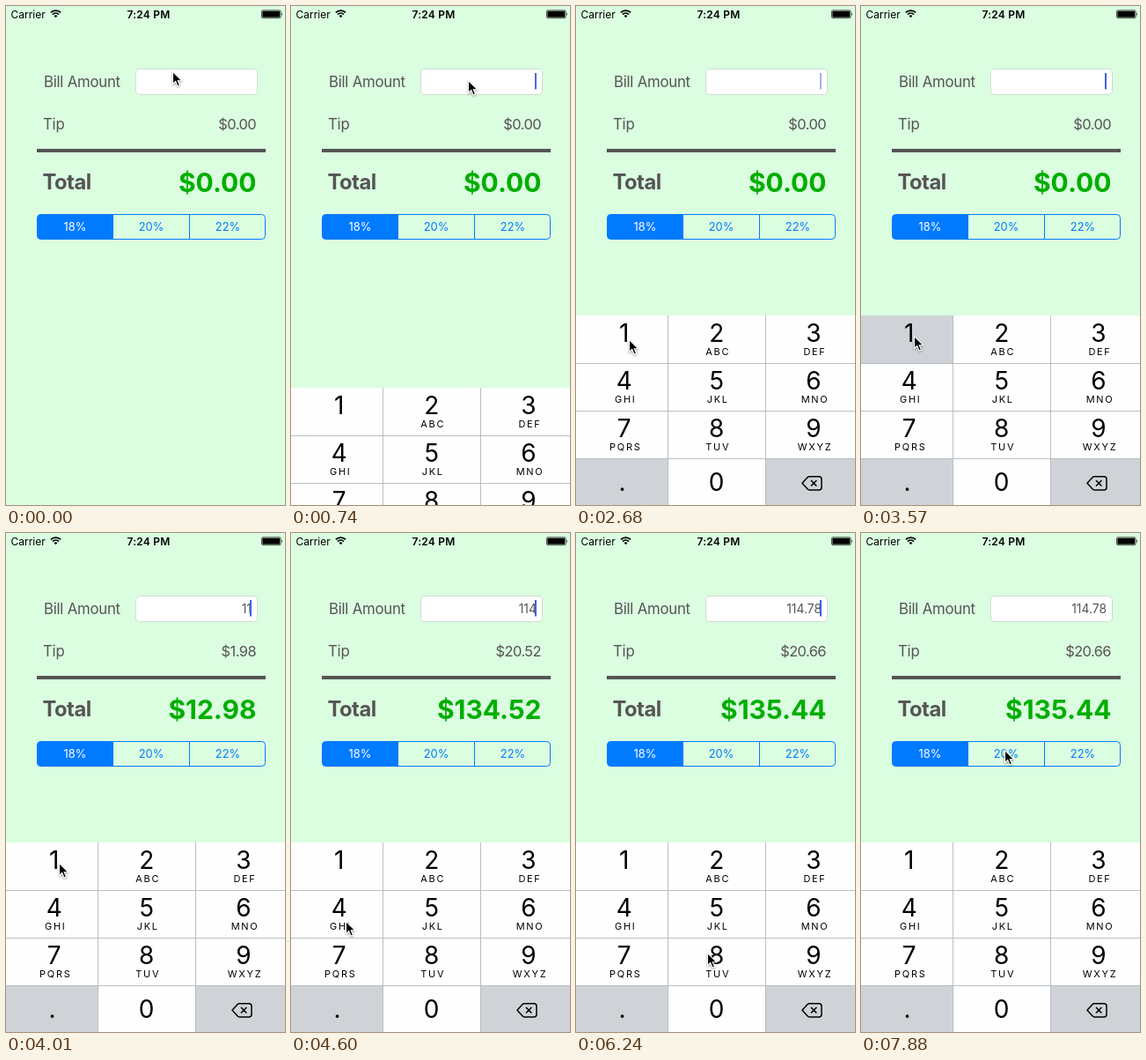
Write an HTML page that moves like this. It is 317x566 px and loops after 8 s.

```html
<!DOCTYPE html>
<html lang="en">
<head>
<meta charset="utf-8">
<title>Tip calculator</title>
<style>
  html, body { margin: 0; width: 100%; height: 100%; overflow: hidden; background: #dbfde0; }
  svg { display: block; font-family: Inter, sans-serif; }
  .label { font-size: 16.8px; letter-spacing: -.25px; fill: #555; }
  .tip { font-size: 16.5px; letter-spacing: -.6px; fill: #555; }
  .amount { font-size: 13.9px; fill: #555; }
  .heading { font-size: 23.8px; font-weight: 700; letter-spacing: -.5px; fill: #555; }
  .total { font-size: 30px; font-weight: 700; fill: #00ae00; }
  .segment { font-size: 12.9px; fill: #007aff; }
  .digit { font-size: 28px; }
  .letters { font-size: 11px; letter-spacing: 1.7px; }
  .end { text-anchor: end; }
  .mid { text-anchor: middle; }
</style>
</head>
<body>
<svg width="317" height="566" viewBox="0 0 317 566">
  <g id="status">
    <text x="5.5" y="14" font-size="12">Carrier</text>
    <g fill="none" stroke="#000" stroke-width="1.8">
      <path d="M50.9 7.4a7.9 7.9 0 0 1 11.2 0M53 9.6a5 5 0 0 1 7 0"/>
    </g>
    <path d="M56.5 13.2l-1.9-1.9a2.7 2.7 0 0 1 3.8 0z"/>
    <text class="mid" x="162" y="14" font-size="12" font-weight="600" letter-spacing=".2">7:24 PM</text>
    <rect x="290.5" y="4.9" width="21.6" height="8.8" rx="1.4" fill="none" stroke="#000" stroke-width=".7"/>
    <rect x="291.4" y="5.8" width="19.8" height="7" rx=".6"/>
    <path d="M313 7.6q1.6 1.7 0 3.4z"/>
  </g>

  <text class="label" x="43" y="91.5">Bill Amount</text>
  <rect x="147.5" y="71.5" width="138" height="29" rx="4.5" fill="#fff" stroke="#cbdbce" stroke-width=".9"/>
  <text class="amount end" id="amount" x="279" y="91"></text>
  <rect id="caret" x="277" y="76" width="2" height="18.5" fill="#4062d8"/>

  <text class="label" x="42" y="139.5">Tip</text>
  <text class="tip end" id="tip" x="284" y="139.5"></text>
  <rect x="35" y="162" width="260" height="4" fill="#555"/>
  <text class="heading" x="41.5" y="208">Total</text>
  <text class="total end" id="total" x="284.5" y="210.5"></text>

  <path d="M122 236.5H39.5a4 4 0 0 0-4 4v20a4 4 0 0 0 4 4H122z" fill="#007aff"/>
  <rect x="35.5" y="236.5" width="259" height="28" rx="4" fill="none" stroke="#007aff"/>
  <path d="M208.5 236.5v28" stroke="#007aff"/>
  <text class="segment mid" x="78.5" y="255" style="fill:#fff">18%</text>
  <text class="segment mid" x="165" y="255">20%</text>
  <text class="segment mid" x="252" y="255">22%</text>

  <g id="keyboard"></g>
  <path id="pointer" d="M0 0V14L3.2 11 5.6 16.6 8 15.6 5.7 10.2H10.1z" stroke="#fff" stroke-width="1.1"
    style="filter:drop-shadow(0 1px 1px #0006)"/>
</svg>
<script>
const DURATION = 8000, TICK = 148.5;   // the screen refreshes once per tick
const WHITE = '#fefefe', GRAY = '#cfd3d8';
const $ = id => document.getElementById(id);

// Keypad, laid out around its resting position
const columns = [0, 104.5, 215.5, 317], rows = [351, 405.5, 459.5, 513.5, 567];
const digitX = [54.7, 159.7, 269.9];
const names = [...'123456789.0<'];
const letters = ['', 'ABC', 'DEF', 'GHI', 'JKL', 'MNO', 'PQRS', 'TUV', 'WXYZ'];
const isGray = name => name === '.' || name === '<';

let cells = '', captions = '', lines = '';
names.forEach((name, i) => {
  const c = i % 3, r = Math.floor(i / 3), x = columns[c], y = rows[r];
  cells += `<rect id="key${name === '<' ? 'Del' : name}" x="${x}" y="${y}"
    width="${columns[c + 1] - x}" height="${rows[r + 1] - y}" fill="${isGray(name) ? GRAY : WHITE}"/>`;
  if (name === '<') {
    captions += `<path d="M257 541.3L263.2 534.6Q264 533.7 265.2 533.7H276a3 3 0 0 1 3 3v9.2a3 3 0 0 1-3 3
      H265.2Q264 548.9 263.2 548zM267 538l6.4 6.6M273.4 538l-6.4 6.6"
      fill="none" stroke="#000" stroke-width="1.5" stroke-linejoin="round"/>`;
    return;
  }
  const dx = name === '.' ? -2.2 : 0, baseline = r < 3 ? 381 + 54 * r : 550;
  captions += `<text class="digit mid" x="${digitX[c] + dx}" y="${baseline}">${name}</text>`;
  if (letters[i])
    captions += `<text class="letters mid" x="${digitX[c] + 1.6}" y="${baseline + 15}">${letters[i]}</text>`;
});
for (const y of rows.slice(1, 4)) lines += `M0 ${y}H317`;
for (const x of columns.slice(1, 3)) lines += `M${x} 351V567`;
$('keyboard').innerHTML = cells + `<path d="${lines}" stroke="#b4b8bc" stroke-width=".9"/>` + captions;

// Pointer stops: [tick, x, y]
const stops = [
  [0, 189, 74], [3, 201, 84], [11, 201, 84], [16, 55, 397], [17, 60, 381], [19, 60, 374],
  [27, 60, 374], [30, 62, 440], [31, 62, 440], [34, 52, 541], [35, 52, 541],
  [38, 55, 482], [39, 55, 482], [41, 149, 476], [44, 149, 476], [52, 163, 246]
];
// A key is held for one tick and typed on release
const presses = [[24, '1'], [26, '1'], [30, '4'], [34, '.'], [38, '7'], [41, '8']];

const clamp = v => Math.max(0, Math.min(1, v));
const smooth = v => v * v * (3 - 2 * v);

function pointerAt(n) {
  const i = stops.findIndex(s => s[0] > n);
  if (i < 0) return stops[stops.length - 1].slice(1);
  const [a, x0, y0] = stops[i - 1], [b, x1, y1] = stops[i];
  const k = smooth((n - a) / (b - a));
  return [x0 + (x1 - x0) * k, y0 + (y1 - y0) * k];
}

function blink(t) {
  const u = ((t % 1000) + 1000) % 1000;
  return u < 500 ? clamp(u / 150) : 1 - clamp((u - 500) / 150);
}

function caretAt(n) {
  if (n < 5) return 0;
  if (n >= 24 && n <= 44) return 1;
  return blink(n * TICK - (n < 24 ? 1600 : 6150));
}

function draw() {
  const n = Math.floor((performance.now() % DURATION + 10) / TICK);

  const [x, y] = pointerAt(n);
  $('pointer').setAttribute('transform', `translate(${Math.round(x) + .5} ${Math.round(y) + .5})`);

  const drop = n < 5 ? 216 : Math.round(82 * .17 ** (n - 5));
  $('keyboard').setAttribute('transform', `translate(0 ${drop})`);
  for (const [tick, name] of presses) {
    const held = presses.some(p => p[0] === n && p[1] === name);
    $('key' + name).setAttribute('fill', held !== isGray(name) ? GRAY : WHITE);
  }

  const typed = presses.filter(p => p[0] < n).map(p => p[1]).join('');
  const bill = Number(typed), tip = bill * .18;
  $('amount').textContent = typed;
  $('tip').textContent = '$' + tip.toFixed(2);
  $('total').textContent = '$' + (bill + tip).toFixed(2);
  $('caret').setAttribute('opacity', caretAt(n));

  requestAnimationFrame(draw);
}
draw();
</script>
</body>
</html>
```
